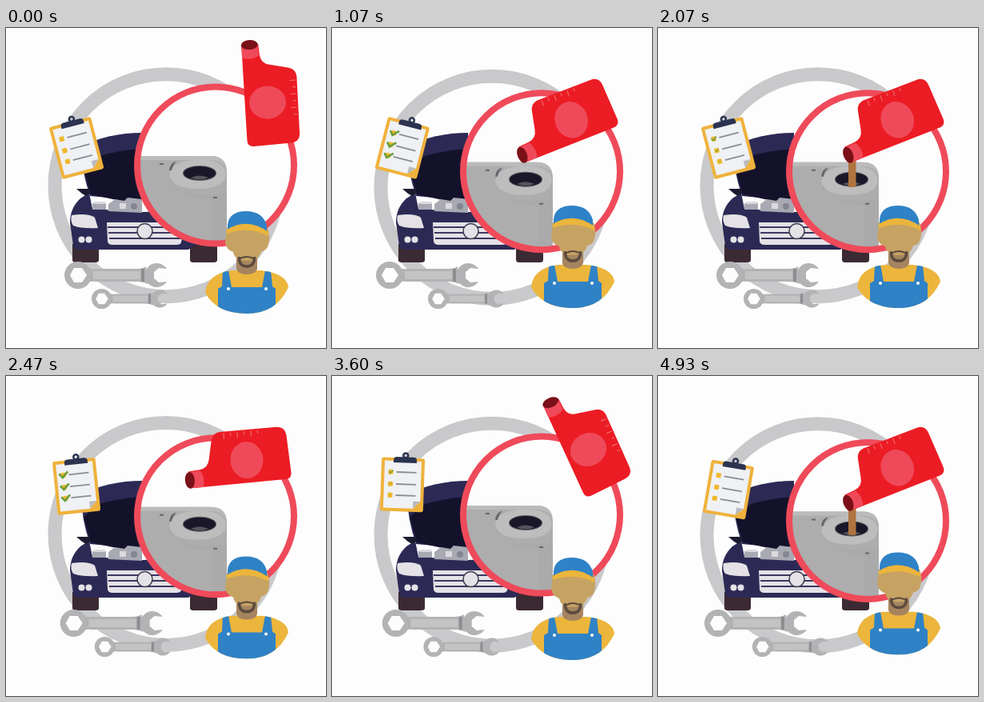
An HTML page for the animation above (4.99 s loop, 400 by 400 pixels).

```html
<!DOCTYPE html>
<html lang="en">
<head>
<meta charset="utf-8">
<title>Oil change</title>
<style>
  html, body { margin: 0; width: 100%; height: 100%; overflow: hidden; background: #fdfdfd; }
  svg { display: block; width: 100vw; height: 100vh; }
</style>
</head>
<body>
<svg viewBox="0 0 400 400">
  <defs>
    <clipPath id="lens"><circle cx="262" cy="171.5" r="98"/></clipPath>
    <clipPath id="bust"><path d="M249 331Q251 307 283 303H319Q351 307 353 324Q338 357 301 357Q263 357 249 331Z"/></clipPath>
    <g id="wrench">
      <path fill="#b3b3b5" d="M28-9Q34-7 40-8H90Q98-8 102-11L104 11Q98 8 90 8H40Q34 7 28 9Z"/>
      <path fill="#c3c3c3" d="M36-5H95V5H36Z"/>
      <path fill="#8d8d92" d="M29-8Q34-7 34 0T29 8ZM96-8H100V8H96Z"/>
      <circle cx="17" r="17" fill="#b3b3b5"/>
      <path fill="#fdfdfd" d="M7 0L12-9H22L28 0L22 9H12Z"/>
      <path fill="#b3b3b5" d="M128-8A15 15 0 1 0 128 8L118 9L112 4V-4L118-9Z"/>
    </g>
  </defs>
  <rect width="400" height="400" fill="#fdfdfd"/>
  <circle id="ring" cx="200" cy="197.5" r="139" fill="none" stroke="#c9c9cb" stroke-width="17"/>

  <g id="car">
    <path fill="#3b2a33" d="M83 270H116V290Q116 293 112 293H87Q83 293 83 290ZM230 270H264V290Q264 293 260 293H234Q230 293 230 290Z"/>
    <path fill="#2c2a55" d="M94 148Q128 131 170 131V216L105 210Q94 178 94 148Z"/>
    <path fill="#14122b" d="M97 176L116 160Q140 153 170 151V222L106 208Z"/>
    <path fill="#2c2a55" d="M104 206L93 213Q80 225 80 243L84 272Q85 277 91 277H228L250 262V228L170 230L108 226Z"/>
    <path fill="#a9a9b3" d="M108 219H125V227H108ZM128 220L136 214L148 216L152 212L170 214V231L128 229Z"/>
    <path fill="#d9d9de" d="M110 217H124V220H110ZM142 219H150V226H142Z"/>
    <circle cx="160" cy="223" r="4" fill="#85858f"/>
    <path fill="#1d1b30" d="M88 201L103 201L106 206L100 210L95 207Z"/>
    <path fill="#e4e2e6" d="M82 234Q103 231 111 237L115 250Q95 251 84 247Q80 241 82 234Z"/>
    <circle cx="94.500" cy="264.500" r="4" fill="#e4e2e6"/>
    <circle cx="103.500" cy="264.500" r="4" fill="#e4e2e6"/>
    <path fill="#e4e2e6" d="M126 243H224L219 268Q218 271 213 271H133Q128 271 127 267Z"/>
    <path stroke="#3c3860" stroke-width="2" d="M127 249H222M128 256H221M129 263H220"/>
    <circle cx="173.500" cy="254" r="9.500" fill="#e4e2e6" stroke="#3c3a50" stroke-width="1.500"/>
  </g>

  <use id="bigWrench" href="#wrench"/>
  <use id="smallWrench" href="#wrench"/>

  <g id="clipboard">
    <rect x="-27" y="-33" width="54" height="67" rx="3" fill="#efb23c"/>
    <path fill="#eff1f4" d="M-23-29H23V21L14 30H-23Z"/>
    <path fill="#b9bac0" d="M14 30V21H23Z"/>
    <circle cx="3" cy="-36" r="3" fill="none" stroke="#2b3350" stroke-width="2.500"/>
    <path fill="#2b3350" d="M-12-27V-30Q-12-34-8-34H13Q17-34 17-30V-27Z"/>
    <g id="items"></g>
  </g>

  <g id="tank">
    <circle cx="262" cy="171.500" r="98" fill="#fdfdfd"/>
    <g clip-path="url(#lens)">
      <path fill="#adadae" d="M150 160H256Q276 160 276 180V290H150Z"/>
      <path fill="#bbbbbc" d="M150 160H256Q274 160 275 178Q274 166 256 165H150Z"/>
      <path fill="#9b9b9d" d="M204 184Q204 202 224 206Q250 210 276 206V290H258V214Q214 216 204 184Z" opacity=".2"/>
      <path fill="#bdbdbe" d="M204 184Q206 167 236 165Q272 163 275 182Q274 201 240 201Q208 201 204 184Z"/>
      <path fill="#66666c" d="M204 178Q205 168 213 167Q208 172 207 178Z"/>
      <path stroke="#66666c" stroke-width="2" d="M192 170H197M259 212H264"/>
      <ellipse cx="242" cy="181.500" rx="21" ry="9.500" fill="#5b5b61"/>
      <ellipse cx="242" cy="181.500" rx="20" ry="8.500" fill="#1a1828"/>
      <path fill="#55535c" d="M231 187Q242 182 253 187Q242 192 231 187Z"/>
    </g>
    <circle cx="262" cy="171.500" r="98" fill="none" stroke="#ef4a5a" stroke-width="8"/>
  </g>

  <rect id="oil" x="238" width="9.500" rx="2" fill="#b07440"/>

  <g id="bottle">
    <path fill="#ec1c24" d="M-29-72Q-19-66-8-74L-7-60Q-6-49 5-47L28-42Q37-40 38-31V40Q38 51 27 52L-20 54Q-28 54-28 46Z"/>
    <path fill="#ef4a5a" d="M-29-73H-9L-8-59Q-18-53-29-57Z"/>
    <ellipse cx="-19" cy="-73" rx="10.500" ry="6" fill="#7a1018"/>
    <ellipse rx="23" ry="20.500" fill="#ef4a5a"/>
    <path id="ticks" stroke="#ee6a6c" stroke-width="1.200"/>
  </g>

  <g id="worker">
    <g clip-path="url(#bust)">
      <rect x="245" y="300" width="112" height="60" fill="#ecb53c"/>
      <path fill="#2f82c6" d="M271 303H278L282 324H320L324 303H331L333 323L337 326V360H265V326L270 323Z"/>
    </g>
    <path fill="#a5845f" d="M288 284H314V301Q312 308 301 308T288 301Z"/>
    <path fill="#c6a363" d="M276 250H327Q331 262 328 271Q326 278 319 279Q316 291 301 291T284 280Q275 277 274 268Z"/>
    <path fill="none" stroke="#5c4a40" stroke-width="3.500" d="M291.500 286Q291 298 301 298T310.500 286"/>
    <path fill="none" stroke="#5c4a40" stroke-width="2" d="M293 288Q301 284 309 288"/>
    <path fill="#2f82c6" d="M277 254V246Q279 229 300 229T326 247V258Q302 242 277 254Z"/>
    <path fill="#ecb53c" d="M276 257V252Q302 236 328 255V260Q303 247 276 257Z"/>
    <circle cx="278" cy="326" r="2" fill="#fdfdfd"/>
    <circle cx="325" cy="326" r="2" fill="#fdfdfd"/>
  </g>
</svg>
<script>
const LOOP = 4990, FRAMES = 75;
const POUR = 3120, SWING = 2080, TICK = 1560;
const $ = id => document.getElementById(id);
const move = (id, value) => $(id).setAttribute('transform', value);
const wave = (t, period) => Math.cos(2 * Math.PI * t / period);
const ramp = (t, a, b) => Math.min(1, Math.max(0, (t - a) / (b - a)));
const ease = x => (1 - Math.cos(Math.PI * x)) / 2;

$('items').innerHTML = [-15, 0, 14].map((y, i) => `
  <rect x="-18" y="${y - 3}" width="6" height="6" rx="1" fill="#f0b92c"/>
  <path d="M-8 ${y}H17" stroke="#8a8c98" stroke-width="1.800"/>
  <path id="check${i}" d="M-5-2L-1 3L6-4" fill="none" stroke="#6a9e3a" stroke-width="2.600"/>`).join('');

$('ticks').setAttribute('d', [0, 1, 2, 3, 4, 5]
  .map(i => `M${i % 2 ? 32 : 29} ${-26 + i * 8.5}H36`).join(''));

function drawBottle(t) {
  const tilt = ease(ramp(t, 280, 940)) - ease(ramp(t, 2240, 3120));
  const turn = -108 * tilt, bulge = Math.sin(Math.PI * tilt);
  move('bottle', `translate(${321 + 2.5 * bulge} ${114 - 11 * bulge * tilt * tilt})
    rotate(${turn}) translate(6 -21) rotate(-3)`);

  const top = 158 + 41 * ramp(t, 2060, 2200);
  const bottom = 158 + 41 * ramp(t, 1220, 1400);
  $('oil').setAttribute('y', top);
  $('oil').setAttribute('height', Math.max(0, bottom - top));
}

function drawChecks(t) {
  [-15, 0, 14].forEach((y, i) => {
    const grow = ramp(t, 360 + 40 * i, 600 + 80 * i) - ramp(t, 1300, 1500);
    move('check' + i, `translate(-15 ${y}) scale(${grow})`);
  });
}

function draw(t) {
  const lift = (1 - wave(t, POUR)) / 2;
  move('tank', `translate(0 ${10 * lift})`);
  move('worker', `translate(0 ${-9 * lift})`);
  drawBottle(t % POUR);

  const swing = wave(t, SWING);
  move('ring', `translate(0 ${0.5 - 1.3 * swing})`);
  move('clipboard', `translate(88 ${135 + 14.5 * swing * swing}) rotate(${-14.5 * swing})`);
  move('bigWrench', `translate(${64 + 9 * swing} 309)`);
  move('smallWrench', `translate(${113.5 - 6.5 * swing} 338.500) scale(.74)`);
  drawChecks(t % TICK);
}

const start = performance.now();
function loop() {
  const t = (performance.now() - start) % LOOP;
  draw(Math.floor(t / LOOP * FRAMES) * LOOP / FRAMES);
  requestAnimationFrame(loop);
}
loop();
</script>
</body>
</html>
```
